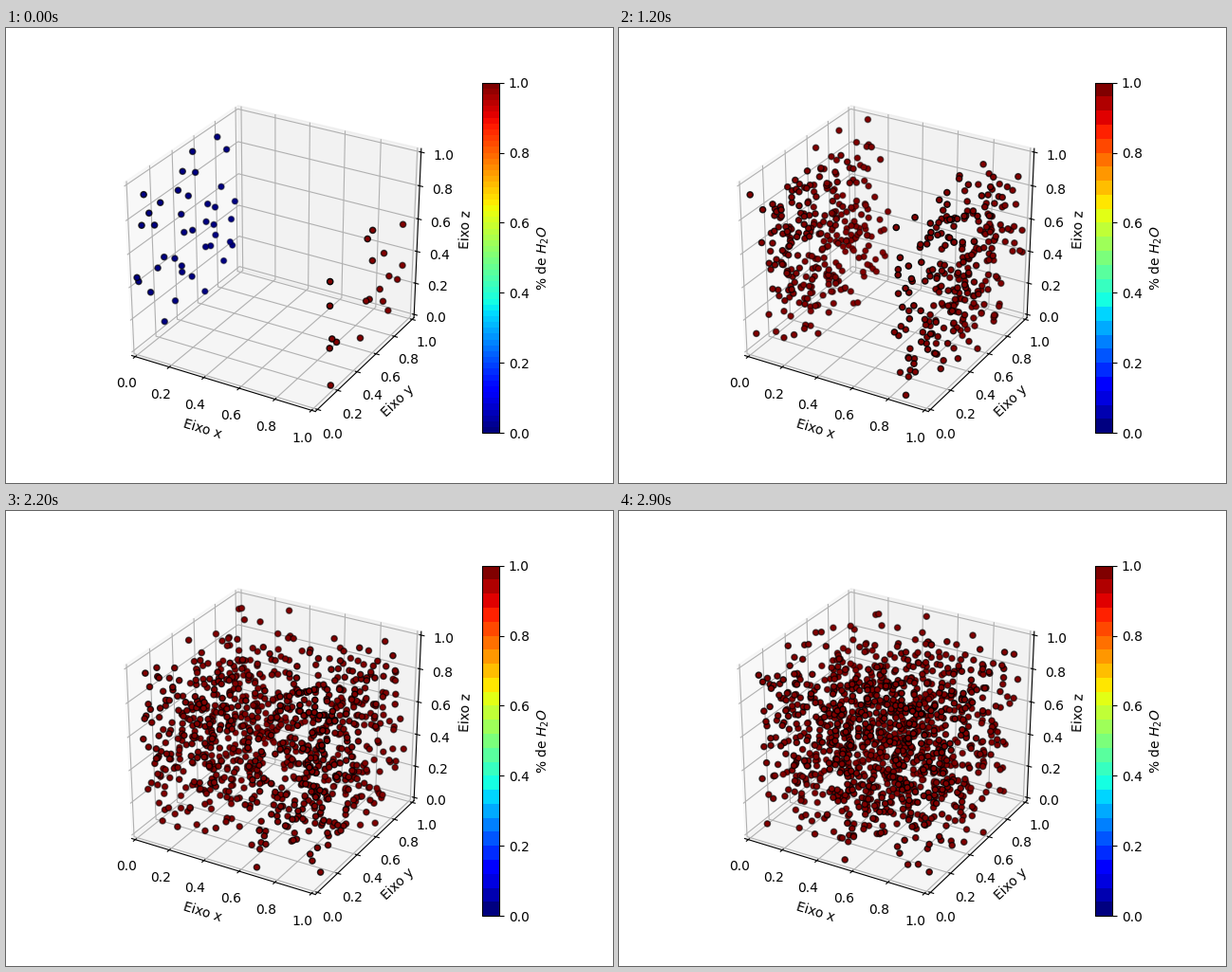
Animation of 640x480 px, one loop 3000 ms. Source, as a matplotlib script:

```python
import math
import numpy as np
import matplotlib.pyplot as plt
from matplotlib.animation import FuncAnimation
from matplotlib.cm import ScalarMappable
from matplotlib.colors import Normalize
from mpl_toolkits.mplot3d import proj3d

FRAMES, INTERVAL = 30, 100
STEP = 0.02              # distance along x per frame
BATCH = 20               # new particles per wall and frame
FIRST_LEFT, FIRST_RIGHT = 40, 20

rng = np.random.default_rng(7)
jet = plt.get_cmap("jet")

fig = plt.figure(figsize=(6.4, 4.8), dpi=100)
ax = fig.add_subplot(projection="3d")
margin = 1 / 48
limits = (-margin, 1 + margin)
ax.set(xlim=limits, ylim=limits, zlim=limits,
       xlabel="Eixo x", ylabel="Eixo y", zlabel="Eixo z")

# A true unit cube, undoing the built-in box scale
ax.set_box_aspect((1, 1, 1), zoom=math.sqrt(3) / 1.8294640721620434)
# Fill the whole subplot instead of shrinking to a square
ax.apply_aspect = lambda position=None: None

scale = ScalarMappable(Normalize(0, 1), jet)
fig.colorbar(scale, ax=ax, label="% de $H_2O$")
proj = ax.get_proj()


def make_side(wall, first):
    """Return wall, birth frame, y and z for all particles of one side."""
    birth = np.repeat(np.arange(FRAMES), [first] + [BATCH] * (FRAMES - 1))
    y, z = rng.beta(1.3, 1.3, (2, len(birth)))
    return np.column_stack([np.full(len(birth), wall), birth, y, z])


particles = np.vstack([make_side(0, FIRST_LEFT), make_side(1, FIRST_RIGHT)])
dots = None


def update(frame):
    global dots
    if dots is not None:
        dots.remove()

    wall, birth, y, z = particles[particles[:, 1] <= frame].T
    x = wall + (1 - 2 * wall) * STEP * (frame - birth)

    # Outlines fade with depth, fills stay opaque
    depth = np.asarray(proj3d.proj_transform(x, y, z, proj)[2])
    edges = np.zeros((len(x), 4))
    edges[:, 3] = 1 - 0.7 * (depth - depth.min()) / np.ptp(depth)
    share = wall if frame == 0 else np.ones(len(x))

    dots = ax.scatter(x, y, z, s=20, c=jet(share), edgecolors=edges,
                      depthshade=False)
    scale.set_cmap(jet.resampled(max(25, 60 - 4 * frame)))
    return [dots]


anim = FuncAnimation(fig, update, frames=FRAMES, init_func=lambda: [],
                     interval=INTERVAL, repeat=True, repeat_delay=0, blit=False)
plt.show()
```
